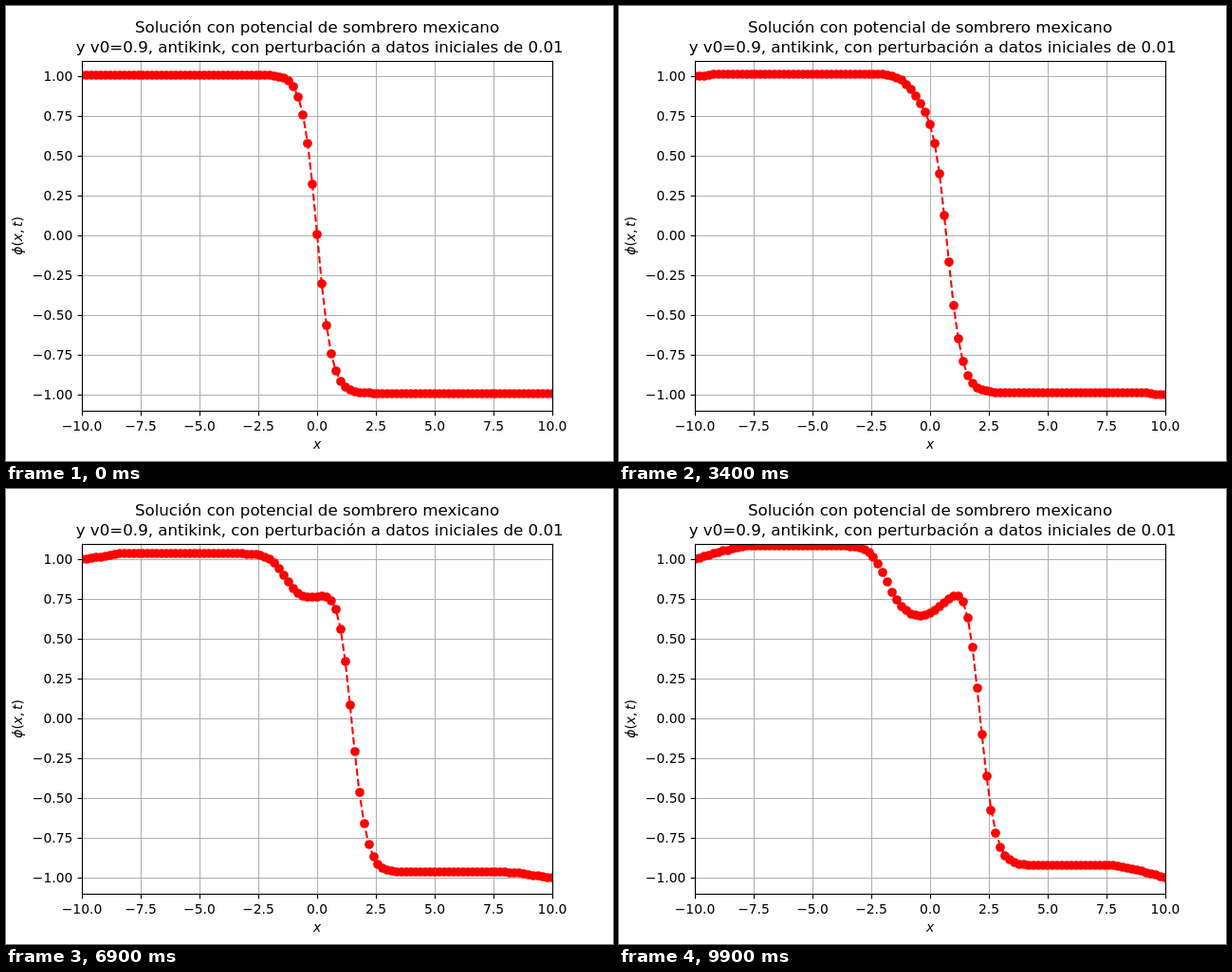
Recreate the animation shown at these times as an HTML page with a canvas. Size 640x480 px, loop 10000 ms.

```html
<!DOCTYPE html>
<html lang="es">
<head>
<meta charset="utf-8">
<title>Antikink</title>
<style>
html, body { margin: 0; width: 100%; height: 100%; overflow: hidden; background: #fff; }
canvas { display: block; }
</style>
</head>
<body>
<canvas id="stage" width="640" height="480"></canvas>
<script>
const ctx = document.getElementById('stage').getContext('2d');
const LEFT = 80, RIGHT = 576, TOP = 57.6, BOTTOM = 427.2;
const PT = 100 / 72;
const FAMILY = '"DejaVu Sans", sans-serif';
const px = x => LEFT + (x + 10) * 24.8;
const py = v => 242.4 - v * 168;
const snap = p => Math.round(p) + 0.5;

// Field equation: u_tt = u_xx + u^3 - u, with fixed ends.
const COUNT = 101, DX = 0.2, STEPS = 100, DT = 0.02;
const V0 = 0.9, BUMP = 0.01;
const K = 1 / Math.sqrt(2 * (1 - V0 * V0));
const xs = Array.from({ length: COUNT }, (_, i) => -10 + i * DX);

function accel(u, i) {
  const lap = (u[i - 1] - 2 * u[i] + u[i + 1]) / (DX * DX);
  return lap + u[i] ** 3 - u[i];
}

function solve() {
  const inner = fn => xs.map((x, i) =>
    i === 0 ? 1 : i === COUNT - 1 ? -1 : fn(x, i));
  const start = xs.map(x => BUMP - Math.tanh(K * x));
  const speed = x => V0 * K / Math.cosh(K * x) ** 2;
  const first = inner((x, i) =>
    start[i] + DT * speed(x) + DT * DT / 2 * accel(start, i));
  const states = [start, first];
  while (states.length < STEPS) {
    const [old, now] = states.slice(-2);
    states.push(inner((x, i) => 2 * now[i] - old[i] + DT * DT * accel(now, i)));
  }
  return states;
}

const states = solve();
const xTicks = Array.from({ length: 9 }, (_, i) => -10 + i * 2.5);
const yTicks = Array.from({ length: 9 }, (_, i) => -1 + i * 0.25);
const number = (v, digits) => v.toFixed(digits).replace('-', '\u2212');

function line(x1, y1, x2, y2) {
  ctx.beginPath();
  ctx.moveTo(x1, y1);
  ctx.lineTo(x2, y2);
  ctx.stroke();
}

function text(str, x, y, size, align, style = '') {
  ctx.font = `${style} ${size * PT}px ${FAMILY}`;
  ctx.textAlign = align;
  ctx.fillText(str, x, y);
}

function drawGrid() {
  ctx.strokeStyle = '#b0b0b0';
  ctx.lineWidth = 0.8 * PT;
  for (const x of xTicks) line(snap(px(x)), TOP, snap(px(x)), BOTTOM);
  for (const v of yTicks) line(LEFT, snap(py(v)), RIGHT, snap(py(v)));
}

function drawCurve(u) {
  ctx.save();
  ctx.beginPath();
  ctx.rect(LEFT, 58, RIGHT - LEFT, 369);
  ctx.clip();
  ctx.strokeStyle = ctx.fillStyle = '#f00';
  ctx.lineWidth = 1.5 * PT;
  ctx.lineJoin = 'round';
  ctx.setLineDash([5.55 * PT, 2.4 * PT]);
  ctx.beginPath();
  u.forEach((v, i) => ctx.lineTo(px(xs[i]), py(v)));
  ctx.stroke();
  u.forEach((v, i) => {
    ctx.beginPath();
    ctx.arc(Math.round(px(xs[i])), Math.round(py(v)), 3.5 * PT, 0, 2 * Math.PI);
    ctx.fill();
  });
  ctx.restore();
}

function drawAxes() {
  const tick = 3.5 * PT;
  ctx.strokeStyle = ctx.fillStyle = '#000';
  ctx.lineWidth = 0.8 * PT;
  ctx.strokeRect(snap(LEFT), snap(TOP), RIGHT - LEFT, snap(BOTTOM) - snap(TOP));
  for (const x of xTicks) {
    const p = snap(px(x));
    line(p, snap(BOTTOM), p, snap(BOTTOM) + tick);
    text(number(x, 1), px(x), 448, 10, 'center');
  }
  for (const v of yTicks) {
    const p = snap(py(v));
    line(snap(LEFT) - tick, p, snap(LEFT), p);
    text(number(v, 2), 70.3, Math.round(py(v) + 4.9), 10, 'right');
  }
}

function drawLabels() {
  text('Solución con potencial de sombrero mexicano', 328, 28, 12, 'center');
  text(' y v0=0.9, antikink, con perturbación a datos iniciales de 0.01', 328, 49, 12, 'center');
  text('x', 328, 467, 10, 'center', 'italic');
  ctx.save();
  ctx.translate(17, 262.7);
  ctx.rotate(-Math.PI / 2);
  let at = 0;
  for (const [str, style, gap] of [['ϕ', 'italic', 0], ['(', '', 0], ['x', 'italic', 0],
    [',', '', 2.6], ['t', 'italic', 0], [')', '', 0]]) {
    text(str, at, 0, 10, 'left', style);
    at += ctx.measureText(str).width + gap;
  }
  ctx.restore();
}

function draw() {
  const step = Math.floor(performance.now() % 10000 / 100);
  ctx.fillStyle = '#fff';
  ctx.fillRect(0, 0, 640, 480);
  drawGrid();
  drawCurve(states[step]);
  drawAxes();
  drawLabels();
  requestAnimationFrame(draw);
}
draw();
</script>
</body>
</html>
```
